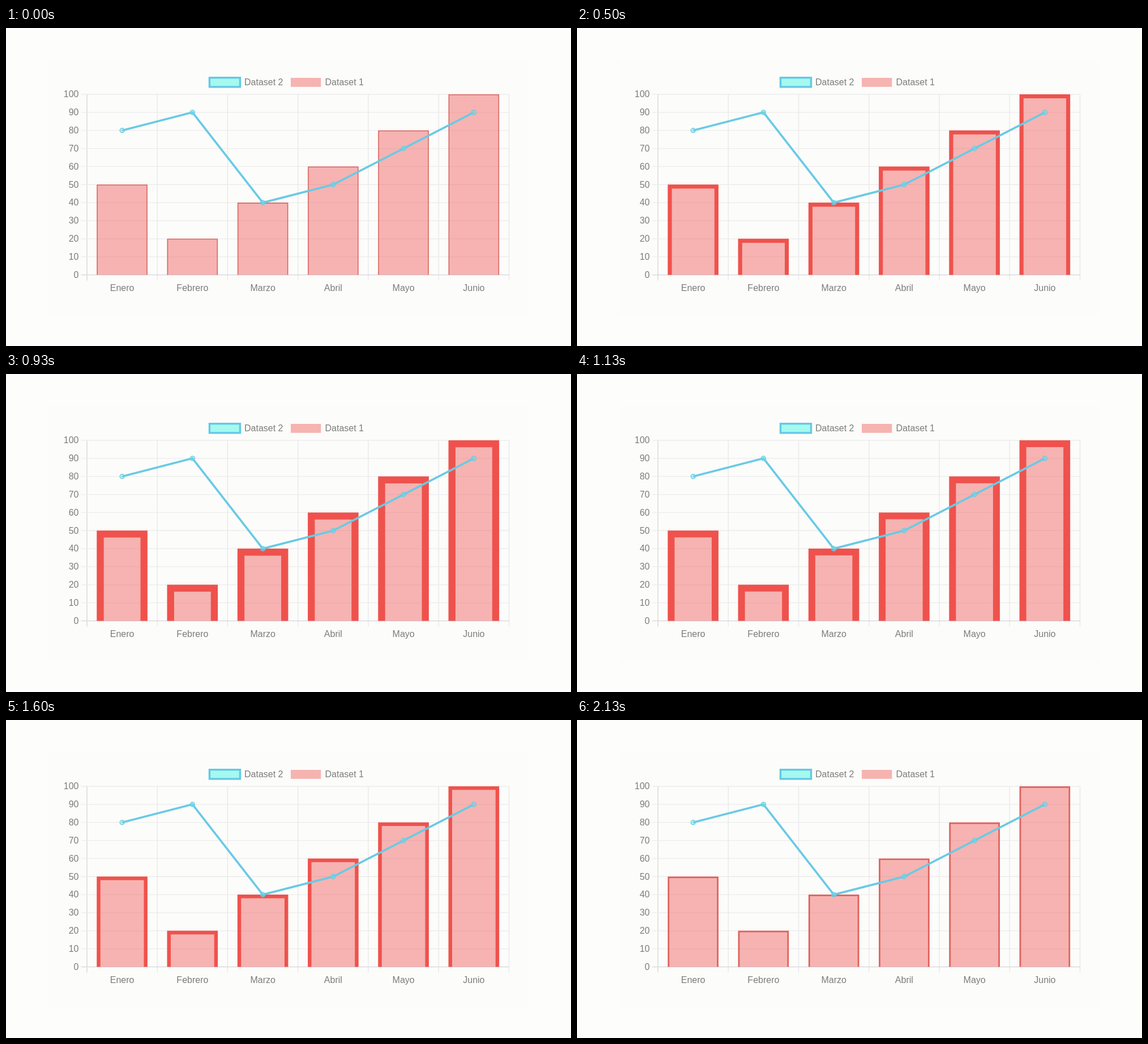
Animation of 998 by 561 pixels, one loop 2.16 s. Source, as an HTML page with a canvas:

```html
<!DOCTYPE html>
<html lang="es">
<head>
<meta charset="utf-8">
<title>Chart</title>
<style>
html, body { margin: 0; width: 100%; height: 100%; overflow: hidden; background: #fdfdfc; }
canvas { display: block; }
</style>
</head>
<body>
<canvas id="chart" width="998" height="561"></canvas>
<script>
const ctx = document.getElementById('chart').getContext('2d');
const LOOP = 2160, STEP = 100 / 3, UNIT = 4 / 3;
const LEFT = 143, RIGHT = 888.5, TOP = 117, BOTTOM = 435.5;
const PITCH = (RIGHT - LEFT) / 6, BAR = PITCH * 0.72;
const PINK = 'rgba(238,96,94,0.47)', BLUE = '#69cae5';
const months = ['Enero', 'Febrero', 'Marzo', 'Abril', 'Mayo', 'Junio'];
const bars = [50, 20, 40, 60, 80, 100];
const points = [80, 90, 40, 50, 70, 90];

const xAt = i => LEFT + PITCH * (i + 0.5);
const yAt = v => BOTTOM - (BOTTOM - TOP) * v / 100;

function box(x, y, w, h, color) {
  ctx.fillStyle = color;
  ctx.fillRect(x, y, w, h);
}

function line(x1, y1, x2, y2, color) {
  ctx.strokeStyle = color;
  ctx.lineWidth = UNIT;
  ctx.beginPath();
  ctx.moveTo(x1, y1);
  ctx.lineTo(x2, y2);
  ctx.stroke();
}

function label(text, x, y, align) {
  ctx.fillStyle = '#7c7c7c';
  ctx.textAlign = align;
  ctx.fillText(text, x, y);
}

function drawLegend() {
  box(360, 88, 53.3, 15.8, '#a5f9ee');
  ctx.strokeStyle = '#62c9e8';
  ctx.lineWidth = 3.4;
  ctx.strokeRect(359.5, 87.7, 54, 16.2);
  label('Dataset 2', 421, 101, 'left');
  box(503, 88, 53.3, 15.8, '#f6b3b0');
  label('Dataset 1', 563.5, 101, 'left');
}

function drawAxes() {
  for (let i = 0; i <= 6; i++) {
    const x = LEFT + PITCH * i;
    line(x, TOP, x, BOTTOM + 10, i ? '#e8e8ec' : '#d6d6d9');
  }
  for (let v = 0; v <= 100; v += 10) {
    const y = yAt(v);
    line(LEFT - 10, y, RIGHT, y, v ? '#ececee' : '#dadae2');
    label(v, 128.5, y + 5.3, 'right');
  }
  months.forEach((m, i) => label(m, xAt(i), 464, 'center'));
}

// Thin borders look duller than thick ones.
function borderColor(border) {
  const k = Math.min(1, Math.max(0, (border - UNIT) / 4));
  return `rgb(${216 + 23 * k},${106 - 24 * k},${101 - 24 * k})`;
}

// The border grows inward and leaves the base open.
function drawBar(value, i, border) {
  const x = xAt(i) - BAR / 2, y = yAt(value), h = BOTTOM - y;
  box(x, y, BAR, h, PINK);
  ctx.fillStyle = borderColor(border);
  ctx.beginPath();
  ctx.rect(x, y, BAR, h);
  ctx.rect(x + border, y + border, BAR - 2 * border, h - border);
  ctx.fill('evenodd');
}

function drawLine() {
  ctx.strokeStyle = BLUE;
  ctx.lineWidth = 3.6;
  ctx.beginPath();
  points.forEach((v, i) => ctx.lineTo(xAt(i), yAt(v)));
  ctx.stroke();
  points.forEach((v, i) => {
    ctx.beginPath();
    ctx.arc(xAt(i), yAt(v), 4, 0, Math.PI * 2);
    ctx.fillStyle = 'rgba(100,225,230,0.45)';
    ctx.fill();
    ctx.lineWidth = UNIT;
    ctx.stroke();
  });
}

function borderAt(t) {
  const phase = Math.abs(t - 20) / 1000 % 2;
  return UNIT * (1 + 9 * (1 - Math.abs(1 - phase)));
}

function draw(t) {
  const border = borderAt(Math.floor((t + 5) / STEP) * STEP);
  box(0, 0, 998, 561, '#fdfdfc');
  box(75, 57, 849, 451, '#fcfcfa');
  ctx.font = '16px "Liberation Sans", Arial, sans-serif';
  drawLegend();
  drawAxes();
  bars.forEach((v, i) => drawBar(v, i, border));
  drawLine();
}

const start = performance.now();
function tick() {
  draw((performance.now() - start) % LOOP);
  requestAnimationFrame(tick);
}
tick();
</script>
</body>
</html>
```
